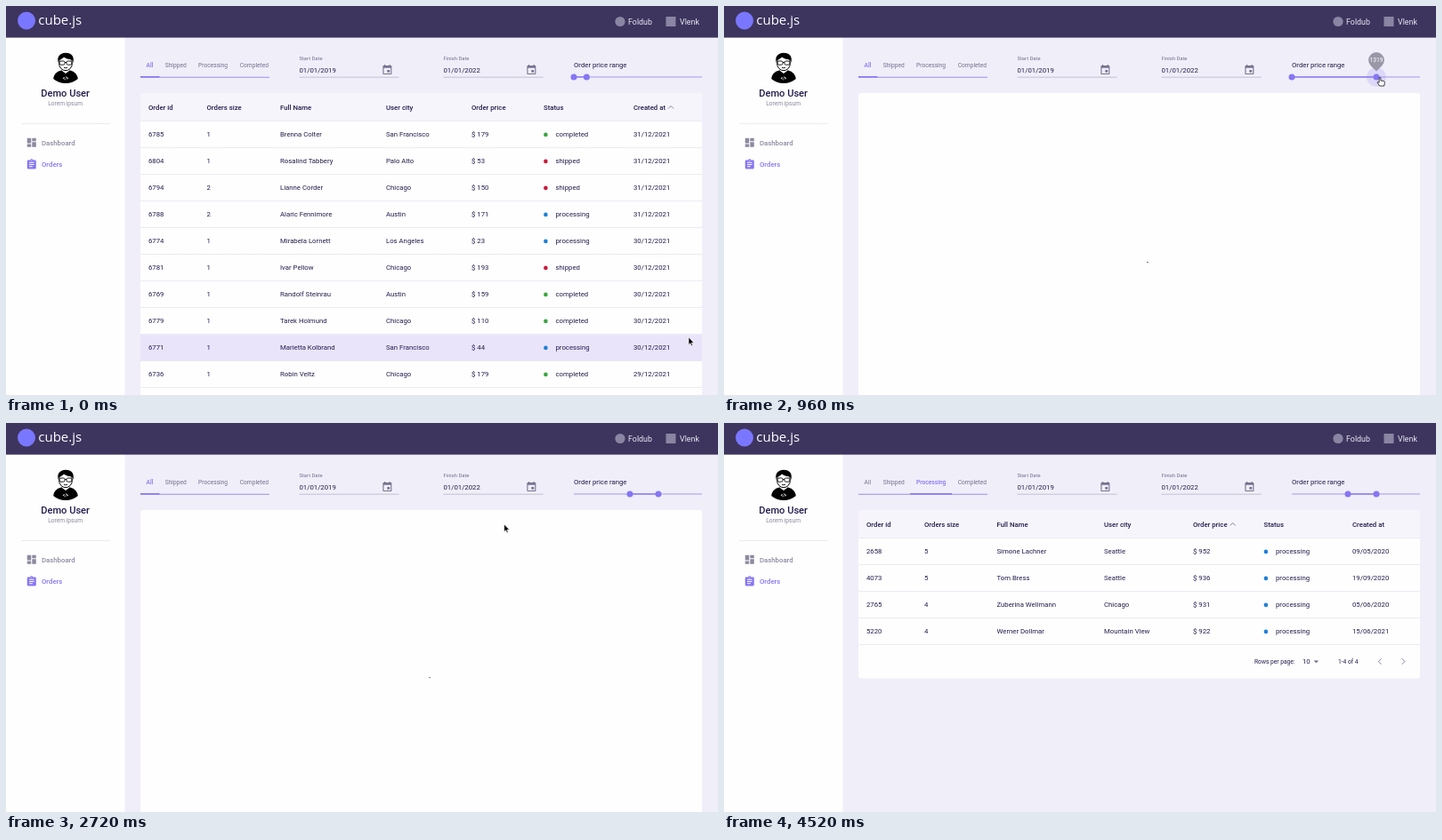
Write an HTML page that moves like this. It is 800 px wide and 438 px high and loops after 4.56 s.

```html
<!DOCTYPE html>
<html lang="en">
<head>
<meta charset="utf-8">
<title>Orders dashboard</title>
<style>
  html, body { margin: 0; width: 100%; height: 100%; overflow: hidden; background: #f0eef9; }
  svg { display: block; width: 100vw; height: 100vh; }
  text { font: 400 7.78px Roboto, sans-serif; fill: #231b4b; white-space: pre; }
  .bold { font-weight: 500; }
  .small { font-size: 6.67px; }
  .label { font-size: 5.83px; fill: #6f6b8c; }
  .link { font-size: 8.89px; fill: #e9e7f3; }
  .muted { fill: #8c899f; }
  .accent { fill: #8676f3; }
  .tab { font-size: 6.67px; fill: #75718f; }
  .tab.on { font-weight: 500; fill: #8676f3; }
  .rule { fill: #e6e4ee; }
  .stroke { fill: none; stroke: #777390; stroke-width: .9; }
</style>
</head>
<body>
<svg id="stage" viewBox="0 0 800 438">
  <defs>
    <path id="event" d="M17 12h-5v5h5v-5zM16 1v2H8V1H6v2H5c-1.1 0-2 .9-2 2v14c0 1.1.9 2 2 2h14c1.1 0 2-.9 2-2V5c0-1.1-.9-2-2-2h-1V1h-2zm3 18H5V8h14v11z"/>
  </defs>
  <rect width="800" height="438" fill="#f0eef9"/>
  <rect y="35" width="133.5" height="403" fill="#fefefe"/>
  <rect width="800" height="35.6" fill="#3d355e"/>

  <circle cx="23" cy="16.5" r="10" fill="#7a77ff"/>
  <text x="36.3" y="21.3" style="font:400 15px 'Open Sans',sans-serif;fill:#fff">cube.js</text>
  <circle cx="690" cy="17.5" r="5.6" fill="#8a85a3"/>
  <text class="link" x="699" y="20.7">Foldub</text>
  <rect x="741.5" y="12" width="11" height="11" fill="#8a85a3"/>
  <text class="link" x="757" y="20.7">Vlenk</text>

  <g id="avatar">
    <path d="M53.2 82Q54 74.5 62 72.5H72Q79.8 74.5 80.8 82Q75 87 67 87T53.2 82Z"/>
    <path d="M63 70h8v3l-4 3-4-3z" fill="#fff"/>
    <ellipse cx="67" cy="64.5" rx="7.4" ry="8.2" fill="#fff" stroke="#000"/>
    <path d="M58.6 64Q56.5 53.5 67 52.8Q77.5 53 75.5 64L74 60.3Q68 60 65 57.5Q63 60 60 60.3Z"/>
    <g fill="#fff" stroke="#000" stroke-width=".9">
      <rect x="60.3" y="62" width="5.7" height="4.2" rx="1.5"/>
      <rect x="68" y="62" width="5.7" height="4.2" rx="1.5"/>
      <path d="M66 63.5h2M65 69.3q2 1 4 0" fill="none"/>
    </g>
    <text x="67" y="83" text-anchor="middle" style="font-size:4.5px;font-weight:700;fill:#fff">&lt;/&gt;</text>
  </g>
  <text class="bold" x="66.6" y="101.8" text-anchor="middle" style="font-size:11.1px">Demo User</text>
  <text class="small muted" x="66.6" y="111.6" text-anchor="middle">Lorem ipsum</text>
  <rect class="rule" x="17" y="132" width="100" height=".7"/>
  <path class="muted" transform="translate(22.1 147.2) scale(.5556)" d="M3 13h8V3H3v10zm0 8h8v-6H3v6zm10 0h8V11h-8v10zm0-18v6h8V3h-8z"/>
  <text class="bold muted" x="40" y="156.8">Dashboard</text>
  <path class="accent" transform="translate(22.1 171.8) scale(.5556)" d="M19 3h-4.2C14.4 1.8 13.3 1 12 1s-2.4.8-2.8 2H5c-1.1 0-2 .9-2 2v14c0 1.1.9 2 2 2h14c1.1 0 2-.9 2-2V5c0-1.1-.9-2-2-2zm-7 0c.6 0 1 .4 1 1s-.4 1-1 1-1-.4-1-1 .4-1 1-1zm2 14H7v-2h7v2zm3-4H7v-2h10v2zm0-4H7V7h10v2z"/>
  <text class="bold accent" x="40" y="181">Orders</text>

  <text class="tab" x="157.6" y="69">All</text>
  <text class="tab" x="178.7" y="69">Shipped</text>
  <text class="tab" x="216" y="69">Processing</text>
  <text class="tab" x="262.7" y="69">Completed</text>
  <rect class="accent" x="151" y="79.8" width="145" height=".8"/>
  <rect class="accent" id="ink" y="79" height="1.5"/>

  <g id="dates"></g>

  <text x="638" y="68.9">Order price range</text>
  <rect class="accent" x="638" y="79.4" width="144" height="1.1" opacity=".65"/>
  <rect class="accent" id="track" y="79.3" height="1.3"/>

  <rect id="card" x="151" y="98" width="631" rx="3" fill="#fefefe"/>
  <rect id="hover" x="151" width="631" height="29.5" fill="#eae4fb"/>
  <g id="tables"></g>
  <circle id="spinner" r="9.6" fill="none" stroke="#5c5774" stroke-width="1.8"/>
  <g id="thumbs"></g>
  <g id="cursor" stroke-linejoin="round">
    <path id="arrow" d="M0 0V8.4L1.9 6.7 3.1 9.5 4.5 8.9 3.3 6.2H5.9Z" stroke="#fff" stroke-width=".6"/>
    <path id="hand" d="M-.9.9Q0-.6.9.9V4L4.5 4.6Q5.7 5 5.4 6.5L4.7 10H-.4L-2.7 6.6Q-3.1 5.2-1.8 5.6L-.9 6.4Z" fill="#fff" stroke="#111" stroke-width=".8"/>
  </g>
</svg>
<script>
const LOOP = 4560, STEP = 40;
const $ = id => document.getElementById(id);

function add(parent, tag, attrs = {}, text = '') {
  const node = document.createElementNS('http://www.w3.org/2000/svg', tag);
  set(node, attrs);
  node.textContent = text;
  parent.append(node);
  return node;
}
function set(node, attrs) {
  for (const key in attrs) node.setAttribute(key, attrs[key]);
}
const show = (node, on) => set(node, { visibility: on ? 'visible' : 'hidden' });

// Eased value at time t along keys of [time, ...values].
function track(keys, t) {
  const next = keys.findIndex(k => k[0] > t);
  if (next === 0) return keys[0].slice(1);
  if (next < 0) return keys[keys.length - 1].slice(1);
  const a = keys[next - 1], b = keys[next];
  const u = (t - a[0]) / (b[0] - a[0]), e = u * u * (3 - 2 * u);
  return a.slice(1).map((v, i) => v + (b[i + 1] - v) * e);
}

const HEADS = ['Order id', 'Orders size', 'Full Name', 'User city', 'Order price', 'Status', 'Created at'];
const NARROW = [160, 225.5, 308, 427, 523, 604, 705];
const WIDE = [160, 225, 306.5, 428, 527, 606.5, 706];
const DOTS = { completed: '#3aa53f', shipped: '#c8193a', processing: '#1d80d8' };

const recent = `6785|1|Brenna Colter|San Francisco|179|completed|31/12/2021
6804|1|Rosalind Tabbery|Palo Alto|53|shipped|31/12/2021
6794|2|Lianne Corder|Chicago|150|shipped|31/12/2021
6788|2|Alaric Fennimore|Austin|171|processing|31/12/2021
6774|1|Mirabela Lornett|Los Angeles|23|processing|30/12/2021
6781|1|Ivar Pellow|Chicago|193|shipped|30/12/2021
6769|1|Randolf Steinrau|Austin|159|completed|30/12/2021
6779|1|Tarek Holmund|Chicago|110|completed|30/12/2021
6771|1|Marietta Kolbrand|San Francisco|44|processing|30/12/2021
6736|1|Robin Veltz|Chicago|179|completed|29/12/2021`;

const wider = `6801|2|Rosemary Tolven|Chicago|327|shipped|31/12/2021
6792|1|Sabine Morva|Los Angeles|235|processing|31/12/2021
6795|2|Nadia Brock|Palo Alto|345|shipped|31/12/2021
6789|2|Ingrid Wolpanowska|Mountain View|348|completed|31/12/2021
6798|1|Florentin LaRoque|San Francisco|224|completed|31/12/2021
6794|2|Lianne Corder|Chicago|150|shipped|31/12/2021
6799|5|Tillie Voss|Los Angeles|664|completed|31/12/2021
6791|2|Beverley Hansolt|Chicago|340|processing|31/12/2021
6796|3|Helena Tommerill|New York|559|processing|31/12/2021
6802|4|Dalton Pruvy|Palo Alto|631|completed|31/12/2021`;

const pricey = `6471|5|Thornton Belsch|Chicago|964|completed|17/10/2021
6023|6|Marleigh Dombrovsky|New York|924|completed|09/08/2021
5882|6|Otis Renk|Palo Alto|937|completed|04/08/2021
5813|5|Nolan Birly|San Francisco|1012|completed|31/07/2021
5676|4|Teresa Holwick|Palo Alto|885|completed|21/07/2021
5331|5|Otis Renk|Palo Alto|1086|completed|28/06/2021
5330|5|Bryleigh Sandermolt|Los Angeles|1115|completed|28/06/2021
5324|5|Hattie Olbrycz|San Francisco|995|completed|27/06/2021
5220|4|Werner Dollmar|Mountain View|922|processing|15/06/2021
5102|5|Clive Rost|Mountain View|950|shipped|11/06/2021`;

const cheapest = `3310|4|Dalton Pruvy|Chicago|876|completed|02/02/2020
1842|5|Sabine Morva|Seattle|878|completed|14/11/2019
4417|4|Ivar Pellow|New York|879|shipped|26/12/2020
2096|5|Tillie Voss|Palo Alto|881|completed|03/01/2020
3975|4|Robin Veltz|Austin|882|completed|30/08/2020
5676|4|Teresa Holwick|Palo Alto|885|completed|21/07/2021
2581|5|Nadia Brock|Los Angeles|887|completed|22/04/2020
1207|4|Tarek Holmund|Chicago|889|shipped|17/07/2019
4862|5|Nolan Birly|Seattle|890|completed|08/04/2021
3124|5|Clive Rost|New York|892|completed|11/06/2020`;

const dearest = `2214|6|Helena Tommerill|Chicago|1246|completed|18/02/2020
3608|6|Lianne Corder|New York|1198|completed|05/07/2020
1935|5|Ivar Pellow|Palo Alto|1152|shipped|09/12/2019
5330|5|Bryleigh Sandermolt|Los Angeles|1115|completed|28/06/2021
4126|6|Brenna Colter|Seattle|1103|completed|01/10/2020
5331|5|Otis Renk|Palo Alto|1086|completed|28/06/2021
2873|5|Dalton Pruvy|Austin|1041|completed|16/06/2020
5813|5|Nolan Birly|San Francisco|1012|completed|31/07/2021
5324|5|Hattie Olbrycz|San Francisco|995|completed|27/06/2021
6471|5|Thornton Belsch|Chicago|964|completed|17/10/2021`;

const pending = `2658|5|Simone Lachner|Seattle|952|processing|09/05/2020
4073|5|Tom Bress|Seattle|936|processing|19/09/2020
2765|4|Zuberina Wellmann|Chicago|931|processing|05/06/2020
5220|4|Werner Dollmar|Mountain View|922|processing|15/06/2021`;

function makeTable(data, cols, sort, up, active) {
  const g = add($('tables'), 'g');
  const rows = data.split('\n').map(line => line.split('|'));
  add(g, 'path', { d: 'M151 129.5V101a3 3 0 0 1 3-3H779a3 3 0 0 1 3 3V129.5Z', fill: '#f7f5fc' });
  HEADS.forEach((head, i) => add(g, 'text',
    { x: cols[i], y: 116.8, class: active && i === sort ? 'bold accent' : 'bold' }, head));
  const chevron = { x: cols[sort] + (sort === 4 ? 44.7 : 42), d: up ? -1 : 1 };
  add(g, 'path', { class: 'stroke', d: `M${chevron.x - 3} ${114 - 1.5 * chevron.d}l3 ${3 * chevron.d} 3 ${-3 * chevron.d}` });
  for (let i = 0; i <= rows.length; i++)
    add(g, 'rect', { class: 'rule', x: 151, y: 129.3 + 30 * i, width: 631, height: .7 });
  rows.forEach((row, r) => row.forEach((value, c) => {
    const status = c === 5, y = 147.3 + 30 * r;
    if (status) add(g, 'circle', { cx: cols[c] + 2.4, cy: y - 2.4, r: 2.3, fill: DOTS[value] });
    add(g, 'text', { x: cols[c] + (status ? 13.5 : 0), y }, (c === 4 ? '$ ' : '') + value);
  }));
  if (rows.length < 10) makeFooter(g, 268.5, rows.length);
  return { g, count: rows.length };
}

function makeFooter(g, y, n) {
  add(g, 'text', { class: 'small', x: 596, y: y + 2.4 }, 'Rows per page:');
  add(g, 'text', { x: 650, y: y + 2.7 }, '10');
  add(g, 'path', { d: `M662.6 ${y - 1}h5.6l-2.8 2.8z`, fill: '#6f6b84' });
  add(g, 'text', { class: 'small', x: 690, y: y + 2.4 }, `1-${n} of ${n}`);
  add(g, 'path', { class: 'stroke', d: `M738.5 ${y - 3.2}l-3.2 3.2 3.2 3.2M761.7 ${y - 3.2}l3.2 3.2-3.2 3.2` });
}

function makeDate(x, label, value) {
  const g = add($('dates'), 'g', { transform: `translate(${x})` });
  add(g, 'text', { class: 'label', y: 61 }, label);
  add(g, 'text', { y: 74.6 }, value);
  add(g, 'rect', { y: 79.8, width: 112, height: .6, fill: '#a29fb8' });
  add(g, 'use', { href: '#event', transform: 'translate(92.2 65.4) scale(.5556)', fill: '#77738f' });
}

function makeThumb() {
  const g = add($('thumbs'), 'g');
  const halo = add(g, 'circle', { class: 'accent', opacity: .18 });
  add(g, 'circle', { class: 'accent', r: 3.5 });
  const balloon = add(g, 'g');
  add(balloon, 'path', { d: 'M0-6.4L-6.3-12.7A8.9 8.9 0 1 1 6.3-12.7Z', fill: '#9a97a9' });
  const text = add(balloon, 'text', { class: 'small', y: -16.6, 'text-anchor': 'middle', style: 'fill:#fff' });
  return { g, halo, balloon, text };
}

makeDate(329.5, 'Start Date', '01/01/2019');
makeDate(491.5, 'Finish Date', '01/01/2022');
const low = makeThumb(), high = makeThumb();

// [start, table]; null means loading.
const scenes = [
  [0, makeTable(recent, NARROW, 6, true)], [920, null],
  [1080, makeTable(wider, WIDE, 6, true)], [1680, null],
  [1800, makeTable(pricey, WIDE, 6, true)],
  [2200, makeTable(pricey, WIDE, 4, false, true)], [2240, null],
  [2320, makeTable(cheapest, WIDE, 4, false, true)], [2720, null],
  [2840, makeTable(dearest, WIDE, 4, true)], [3400, null],
  [3520, makeTable(pending, WIDE.map((x, i) => i === 3 ? 427 : x), 4, true)]
];

const path = [
  [0, 767, 373], [520, 659, 82], [560, 657, 76], [600, 657, 77], [880, 737, 79], [960, 737, 80],
  [1160, 640, 79], [1240, 640, 79], [1560, 704, 79], [1700, 704, 80], [2040, 559.7, 114],
  [2800, 559.7, 114], [3240, 226.5, 61], [3920, 226.5, 61], [4080, 698, 272],
  [4340, 698, 272], [4500, 618, 251]
];
const lowX = [[1296, 638], [1665, 701]];
const highX = [[616, 652.4], [900, 733]];
const lowPop = [[1140, 0], [1220, 1], [1690, 1], [1770, 0]];
const highPop = [[500, 0], [600, 1], [980, 1], [1060, 0]];
const inkKeys = [[3300, 151, 21.5], [3500, 209, 47]];
const tabs = document.querySelectorAll('.tab');

function drawThumb(thumb, x, pop) {
  set(thumb.g, { transform: `translate(${x} 80)` });
  set(thumb.halo, { r: 10.8 * pop });
  set(thumb.balloon, { transform: `scale(${pop})` });
  show(thumb.balloon, pop > 0);
  thumb.text.textContent = Math.round((x - 638) / 144 * 2000);
}

function drawSpinner(age) {
  const turn = age / 1400, length = .8 + 50 * Math.min(1, 2 * turn) ** 2;
  set($('spinner'), {
    'stroke-dasharray': `${length} 100`,
    transform: `translate(466.5 286.3) rotate(${360 * turn})`
  });
}

function render(t) {
  const [start, table] = scenes.findLast(s => s[0] <= t);
  for (const [, other] of scenes) if (other) show(other.g, other === table);
  set($('card'), { height: table && table.count < 10 ? 189.5 : 345 });
  show($('spinner'), !table);
  drawSpinner(t - start);

  const [x, y] = track(path, t);
  const row = Math.floor((y - 130) / 30);
  show($('hover'), table && row >= 0 && row < table.count);
  set($('hover'), { y: 130 + 30 * row });

  const pointing = y < 86 && (x > 636 || x < 296);
  set($('cursor'), { transform: `translate(${x} ${y})` });
  show($('hand'), pointing && t < 4520);
  show($('arrow'), !pointing && t < 4520);

  const [a] = track(lowX, t), [b] = track(highX, t);
  drawThumb(low, a, track(lowPop, t)[0]);
  drawThumb(high, b, track(highPop, t)[0]);
  set($('track'), { x: a, width: b - a });

  const [inkX, width] = track(inkKeys, t);
  set($('ink'), { x: inkX, width });
  tabs.forEach((tab, i) => tab.classList.toggle('on', i === (t < 3320 ? 0 : 2)));
}

const begin = performance.now();
function tick() {
  const t = (performance.now() - begin + 1) % LOOP;
  render(Math.floor(t / STEP) * STEP);
  requestAnimationFrame(tick);
}
tick();
</script>
</body>
</html>
```
